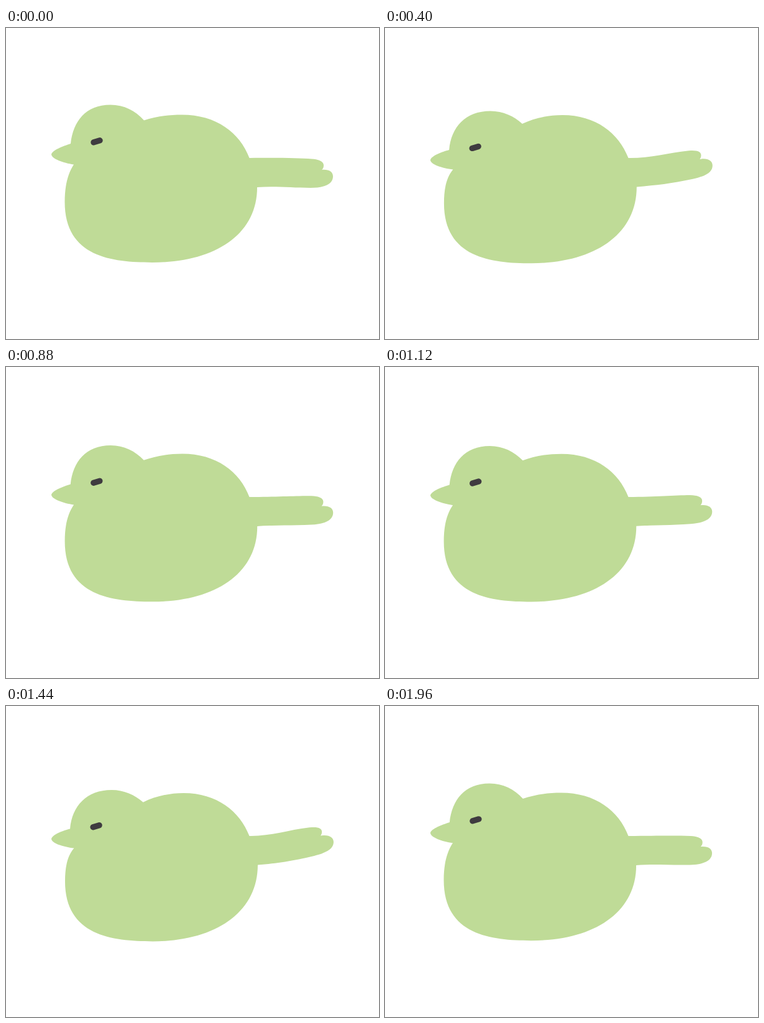
These frames come from a looping animation (600 px wide and 500 px high, 2 s). An HTML page:

```html
<!DOCTYPE html>
<html lang="en">
<head>
<meta charset="utf-8">
<title>Bird</title>
<style>
html, body { margin: 0; width: 100%; height: 100%; overflow: hidden; background: #fff; }
svg { display: block; width: 600px; height: 500px; }
</style>
</head>
<body>
<svg viewBox="0 0 600 500">
  <path id="bird" fill="#bfdb97"/>
  <path id="eye" fill="none" stroke="#3f3b40" stroke-width="9.4" stroke-linecap="round"/>
</svg>
<script>
// Outline with head up and tail down, then head down and tail up.
const up = `M73,203 C75,196 92,190 104,186
  C108,150 128,123.5 168,123.5 C190,123.5 208,133 222,148.5
  C240,142.5 260,139.5 283,139.5 C338,139.5 376,168 391.5,209
  C440,208.5 470,209 492,210.5 C505,211.5 511,215 511,221
  C511,224 510,226 508,228 C519,227 526,231 526,238.5
  C526,249 516,257 490,257 C460,257 435,254 404,256
  C404,333 335,377 235,377 C170,377 94,368 94.5,279
  C94.5,255 99,235 109,219.5 C92,217 73,210 73,203Z`;
const down = `M73,214 C75,207 91,201 103,198
  C106,161 130,135.5 170,135.5 C190,135.5 207,143.5 220.5,155
  C240,145.5 262,140 286,140 C339,140 376,169 391.5,209
  C425,209.5 452,199 488,194.5 C502,193 508,195.5 508,201.5
  C508,204 507,206 506,207.5 C519,205 527,210 527,217.5
  C527,226 521,233.5 496,240 C460,249 437,252.5 405,255.5
  C405,333 335,378.5 236,378.5 C170,378.5 95,369 95,282
  C95,258 99,241 109.5,229 C92,227 73,221 73,214Z`;
const eyeUp = "M141,183.8 L151,180.8";
const eyeDown = "M140,195.3 L150,192.3";

const LOOP = 2000, STEP = 40;
const turns = [0, 480, 985, 1465, 2010]; // times where the nod reverses
const number = /[\d.]+/g;

function morph(from, to, k) {
  const ends = to.match(number);
  let i = 0;
  return from.replace(number, n => (+n + (ends[i++] - n) * k).toFixed(2));
}

function nod(t) {
  const i = turns.findIndex(end => t < end) - 1;
  const k = (t - turns[i]) / (turns[i + 1] - turns[i]);
  return i % 2 ? 1 - k : k;
}

const bird = document.getElementById("bird");
const eye = document.getElementById("eye");
const start = performance.now();

function draw() {
  const time = (performance.now() - start) % LOOP;
  const k = nod(Math.floor(time / STEP) * STEP);
  bird.setAttribute("d", morph(up, down, k));
  eye.setAttribute("d", morph(eyeUp, eyeDown, k));
  requestAnimationFrame(draw);
}
draw();
</script>
</body>
</html>
```
